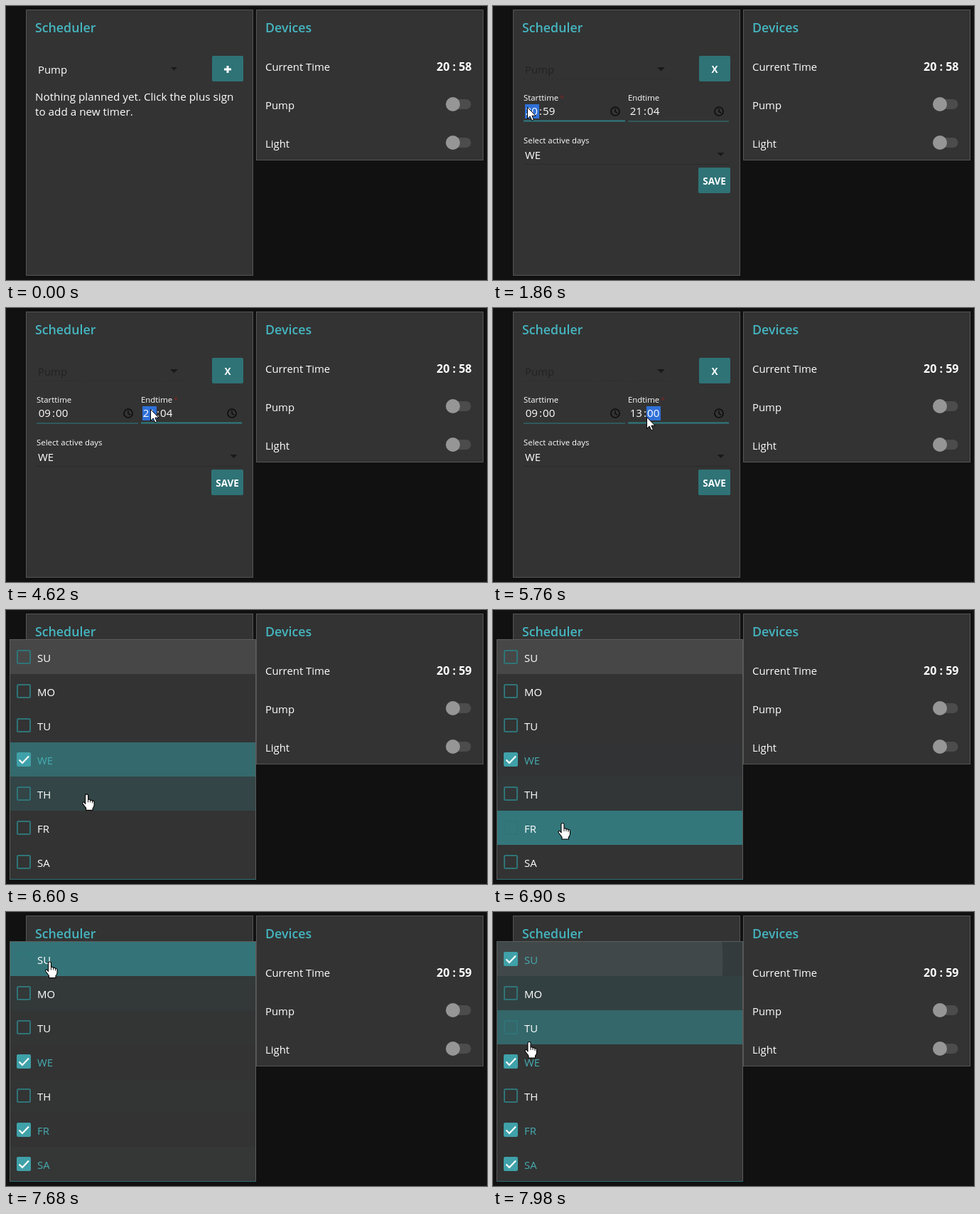
An HTML page for the animation above (8000 ms loop, 677 by 385 pixels).

```html
<!DOCTYPE html>
<html lang="en">
<head>
<meta charset="utf-8">
<title>Scheduler</title>
<style>
  html, body { margin: 0; width: 100%; height: 100%; overflow: hidden; background: #111; }
  svg { display: block; width: 677px; height: 385px; font: 14.9px "Open Sans", "Noto Sans", sans-serif; }
</style>
</head>
<body>
<svg id="stage" viewBox="0 0 677 385"></svg>
<script>
const LOOP = 8000, STEP = 60;
const OPEN_FORM = 1020, OPEN_MENU = 6180;
const TEAL = '#2f7377', ACCENT = '#45b5c0', PANEL = '#333', WHITE = '#fff';
const DAYS = ['SU', 'MO', 'TU', 'WE', 'TH', 'FR', 'SA'];
const ROW_TOP = 42, ROW_H = 48;
const CLICKS = { 5: 7080, 6: 7260, 0: 7740 };

// Pointer tip: time, x, y
const PATH = [
  [120, 634, 39], [420, 400, 78], [600, 273, 98], [720, 309, 90],
  [1020, 309, 90], [1320, 200, 122], [1680, 48, 142],
  [2520, 48, 142], [2700, 49, 143], [2940, 49, 143], [3180, 77, 141],
  [3420, 77, 141], [3480, 80, 142], [3720, 120, 149], [4140, 202, 142],
  [4560, 202, 142], [4620, 203, 142], [5340, 203, 142], [5640, 215, 152],
  [5760, 216, 153], [6120, 170, 185], [6360, 165, 188], [6560, 120, 240],
  [6660, 104, 286], [6900, 98, 299], [7080, 97, 303], [7200, 96, 347],
  [7260, 95, 350], [7290, 94, 338], [7380, 78, 166], [7500, 66, 74],
  [7740, 60, 68], [7860, 56, 150], [7980, 51, 182]
];

const clamp = v => Math.min(1, Math.max(0, v));
const mix = (a, b, p) => a + (b - a) * p;

function pointer(t) {
  if (t <= PATH[0][0]) return PATH[0].slice(1);
  for (let i = 1; i < PATH.length; i++) {
    const [t1, x1, y1] = PATH[i];
    if (t > t1) continue;
    const [t0, x0, y0] = PATH[i - 1];
    const p = (t - t0) / (t1 - t0);
    return [mix(x0, x1, p), mix(y0, y1, p)];
  }
  return PATH[PATH.length - 1].slice(1);
}

const rect = (x, y, w, h, fill, more = '') =>
  `<rect x="${x}" y="${y}" width="${w}" height="${h}" fill="${fill}" ${more}/>`;
const text = (x, y, s, more = '') => `<text x="${x}" y="${y}" fill="${WHITE}" ${more}>${s}</text>`;
const path = (d, more) => `<path d="${d}" ${more}/>`;
const bold = 'font-weight="700" text-anchor="middle"';
const caret = (x, y, r) =>
  path(`M${x - r} ${y}h${2 * r}l${-r} ${r}z`, 'fill="#191919"');

const panel = (x, h, title) =>
  rect(x + .5, 5.5, 319, h, PANEL, 'stroke="#555"') +
  text(x + 13, 37, title, `style="fill:${ACCENT}" font-size="17.8" font-weight="600"`);

const toggle = y =>
  rect(620, y - 7, 34.5, 14, '#4c4c4c', 'rx="7"') +
  `<circle cx="629" cy="${y}" r="10" fill="#969696"/>`;

function devices(t) {
  return panel(352, 211, 'Devices') +
    text(365, 91, 'Current Time') +
    text(655.5, 91, t < 5520 ? '20 : 58' : '20 : 59', 'font-size="16" font-weight="700" text-anchor="end"') +
    text(365, 145, 'Pump') + toggle(138) +
    text(365, 199, 'Light') + toggle(192);
}

function timeField(x, label, hours, minutes, part) {
  const on = part >= 0, w = x < 100 ? 143 : 142;
  let s = text(x, 133, label, 'font-size="11.4"');
  if (on) {
    s += text(x + (x < 100 ? 51 : 46), 133, '*', 'style="fill:#7c2626" font-size="11.4"');
    s += rect(x + 2 + part * 24, 138, 20, 20, '#2f70d8');
  }
  const size = 'font-size="15.1"';
  s += text(x + 2.7, 153, hours, size) + text(x + 22, 153, ':', size) + text(x + 27, 153, minutes, size);
  const cx = x < 100 ? 172 : 318;
  s += `<circle cx="${cx}" cy="148" r="6" fill="none" stroke="#0c0c0c" stroke-width="1.6"/>`;
  s += path(`M${cx} 144v4.4l3 2`, 'fill="none" stroke="#0c0c0c" stroke-width="1.4"');
  return s + rect(x, on ? 160.5 : 161.5, w, on ? 2 : 1, '#2f7f83');
}

function form(t) {
  const startPart = t < 1860 || t >= 4200 ? -1 : t < 3060 ? 0 : 1;
  const endPart = t < 4200 ? -1 : t < 5340 ? 0 : 1;
  const startHours = t < 2940 ? '20' : t < 3060 ? '00' : '09';
  const endHours = t < 4920 ? '21' : t < 5340 ? '01' : '13';
  return text(45, 95, 'Pump', 'style="fill:#222"') + caret(236.5, 86, 5.5) +
    path('M43 102.5H248', 'stroke="#262626" stroke-dasharray="1 3"') +
    text(312, 94, 'X', bold + ' font-size="13.5"') +
    timeField(43, 'Starttime', startHours, t < 3660 ? '59' : '00', startPart) +
    timeField(190, 'Endtime', endHours, t < 5580 ? '04' : '00', endPart) +
    text(43, 193, 'Select active days', 'font-size="11.4"') +
    text(45, 215, 'WE') + caret(320.5, 206, 5) +
    rect(43, 222, 289, 1, '#2a2a2a') +
    rect(289, 227, 45, 36, TEAL, 'rx="2"') +
    text(311.5, 251, 'SAVE', bold + ' font-size="13.5"');
}

function scheduler(t) {
  let s = panel(28, 373, 'Scheduler') + rect(290, 70, 44, 36, TEAL, 'rx="2"');
  if (t >= OPEN_FORM) return s + form(t);
  return s + text(45, 95, 'Pump') + caret(236.5, 86, 4.5) +
    path('M307 89h10M312 84v10', `stroke="${WHITE}" stroke-width="3"`) +
    text(41, 133, 'Nothing planned yet. Click the plus sign', 'font-size="15.25"') +
    text(41, 154, 'to add a new timer.', 'font-size="15.25"');
}

// Row highlights ease towards the row under the pointer
function hovers(t) {
  const level = DAYS.map(() => 0);
  for (let u = OPEN_MENU; u < t; u += 10) {
    const row = Math.floor((pointer(u - 40)[1] - ROW_TOP) / ROW_H);
    level.forEach((v, i) => { level[i] += ((i === row) - v) * .13; });
  }
  return level;
}

function ripple(i, t) {
  const age = t - CLICKS[i];
  if (!(age >= 0 && age < 450)) return '';
  const [x, y] = pointer(CLICKS[i]);
  const r = (351 - x) * (1 - Math.pow(1 - age / 450, 3.1));
  const fade = .14 * (1 - age / 450);
  return `<circle cx="${x}" cy="${y}" r="${r}" fill="#fff" opacity="${fade}" clip-path="url(#row${i})"/>`;
}

function option(i, t, hover) {
  const y = ROW_TOP + i * ROW_H;
  const checked = i === 3 || t >= CLICKS[i];
  let s = `<clipPath id="row${i}">${rect(6, y, 345, ROW_H, WHITE)}</clipPath>`;
  if (i === 0) s += rect(6, y, 345, ROW_H, '#474747', `opacity="${1 - clamp((t - 7500) / 200)}"`);
  s += rect(6, y, 345, ROW_H, '#347c80', `opacity="${hover}"`);
  s += ripple(i, t);
  if (checked) {
    s += rect(15, y + 14, 20, 20, '#3fa1a9', 'rx="2"') +
      path(`M18.5 ${y + 24.5}l4.5 4.5l9 -9.5`, 'fill="none" stroke="#fff" stroke-width="2.2"');
  } else {
    s += rect(16, y + 15, 18, 18, 'none', 'rx="1.5" stroke="#2f7478" stroke-width="2"');
  }
  return s + text(44, y + 31, DAYS[i], checked ? 'style="fill:#45acb2"' : '');
}

function menu(t) {
  if (t < OPEN_MENU) return '';
  const p = clamp((t - OPEN_MENU + STEP) / 120), k = mix(.8, 1, p);
  const level = hovers(t);
  return `<g opacity="${p}" transform="translate(0 ${210 * (1 - k)}) scale(1 ${k})">` +
    rect(5.5, 41.5, 346, 337, PANEL, 'stroke="#5c5c5c"') +
    DAYS.map((d, i) => option(i, t, level[i])).join('') +
    rect(6, 378, 346, 1, '#2f6f73') + '</g>';
}

function cursor(t) {
  if (t < PATH[0][0]) return '';
  const [x, y] = pointer(t);
  const onButton = t < 1080 && x > 290 && x < 334 && y > 70 && y < 106;
  const at = `<g transform="translate(${x} ${y})" stroke="#000" stroke-linejoin="round">`;
  if (onButton || t >= 6120) {
    return at + path('M-2 2Q-2 .5 0 .5T2 2V8Q4 7 5 9Q7 8 8 10Q10 9 10.5 11.5V16Q10 19 8.5 20V23H-1V20' +
      'L-5.5 14Q-6.5 12 -5 11.5T-2 14Z', 'fill="#fff" stroke-width="1.1"') +
      path('M2 8v4M5 9v3M8 10v3', 'fill="none" stroke-width=".9"') + '</g>';
  }
  return at + path('M.5 .5V16.5L4.2 13L6.8 19L9.4 17.9L6.9 12.2H12Z', 'fill="#fff"') + '</g>';
}

const stage = document.getElementById('stage');

function draw(t) {
  stage.innerHTML = rect(0, 0, 677, 385, '#111') + scheduler(t) + devices(t) + menu(t) + cursor(t);
}

const start = performance.now();
let last = -1;
function tick() {
  const now = (performance.now() - start) % LOOP;
  const t = Math.floor(now / STEP) * STEP;
  if (t !== last) draw(last = t);
  requestAnimationFrame(tick);
}
tick();
</script>
</body>
</html>
```
